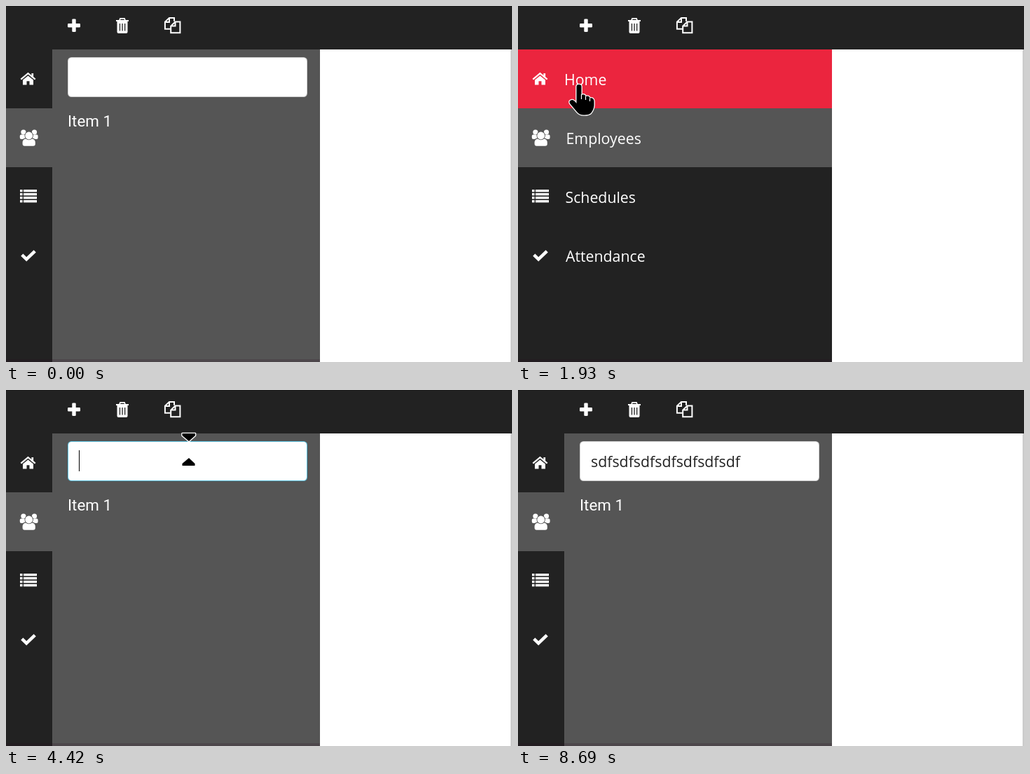
Write an HTML page with a canvas that moves like this. It is 722 by 508 pixels and loops after 8790 ms.

```html
<!DOCTYPE html>
<html lang="en">
<head>
<meta charset="utf-8">
<title>Sidebar menu</title>
<style>
html, body { margin: 0; width: 100%; height: 100%; overflow: hidden; background: #fff; }
canvas { display: block; }
</style>
</head>
<body>
<canvas id="stage" width="722" height="508"></canvas>
<script>
const ctx = document.getElementById('stage').getContext('2d');
const LOOP = 8790, FADE = 400, DARK = '#222', GREY = '#555';
const BAR = 62, ROW = 84, CLOSED = 66, OPEN = 448;
const FOCUS = 4420, BLUR = 8690, TYPE_START = 4770, TYPE_END = 6260, BLINK = 530;
const SANS = '21.3px "Open Sans", "Noto Sans", sans-serif';
const TYPED = 'sdf'.repeat(7);

// Pointer stops: time, x, y
const stops = [
  [70, 565, 300], [650, 50, 298], [1130, 61, 361], [1836, 87, 112], [1930, 87, 112],
  [2590, 229, 56], [2670, 229, 56], [3200, 100, 32], [3680, 215, 45], [4230, 260.5, 85],
  [6270, 260.5, 85], [6580, 108, 165], [6690, 193, 174], [6790, 193, 174],
  [6900, 40, 186], [7150, 530, 210], [7650, 330, 170], [8330, 690, 410]
];

const within = (x, y, l, t, w, h) => x >= l && x < l + w && y >= t && y < t + h;

// Hover zones; spans of [enter, leave] are found by walking the pointer path
const zone = hit => ({ hit, spans: [] });
const menuZone = zone((x, y, width) => within(x, y, 0, BAR, width, 4 * ROW));
const itemZone = zone((x, y, width) => x >= width && within(x, y, 88, 145, 342, 36));
const rows = [['Home', 66, home], ['Employees', 68.5, users], ['Schedules', 67.5, list], ['Attendance', 68, check]]
  .map(([label, x, icon], i) => ({
    label, x, icon, active: i === 1, y: BAR + ROW * i,
    ...zone((x, y, width) => within(x, y, 0, BAR + ROW * i, width, ROW))
  }));
const tools = [plus, trash, copy].map((icon, i) => {
  const x = Math.round(66 + 68.5 * i);
  return { x, icon, ...zone((px, py) => within(px, py, x, 0, 68, BAR)) };
});

// CSS "ease": cubic-bezier(.25, .1, .25, 1)
function ease(x) {
  if (x <= 0) return 0;
  if (x >= 1) return 1;
  let lo = 0, hi = 1, s;
  for (let i = 0; i < 20; i++) {
    s = (lo + hi) / 2;
    if (.75 * s * (1 - s) + s ** 3 < x) lo = s; else hi = s;
  }
  return .3 * s * (1 - s) ** 2 + 3 * s * s * (1 - s) + s ** 3;
}

const hover = (zone, t) => Math.min(1, zone.spans.reduce((sum, [a, b]) =>
  sum + ease((t - a) / FADE) * (1 - ease((t - b) / FADE)), 0));
const menuWidth = t => Math.round(CLOSED + (OPEN - CLOSED) * hover(menuZone, t));

function pointerAt(t) {
  const i = stops.findIndex(s => s[0] > t);
  if (i < 1) return null;
  const [t0, x0, y0] = stops[i - 1], [t1, x1, y1] = stops[i];
  const u = (t - t0) / (t1 - t0), k = u * u * (3 - 2 * u);
  return [x0 + (x1 - x0) * k, y0 + (y1 - y0) * k];
}

function findSpans() {
  for (let t = 0; t < LOOP; t += 2) {
    const p = pointerAt(t), width = menuWidth(t);
    for (const z of [menuZone, itemZone, ...rows, ...tools]) {
      const over = p !== null && z.hit(...p, width);
      const last = z.spans.at(-1);
      const inside = last !== undefined && last[1] === Infinity;
      if (over && !inside) z.spans.push([t, Infinity]);
      if (!over && inside) last[1] = t;
    }
  }
}

function rect(x, y, w, h, color) {
  ctx.fillStyle = color;
  ctx.fillRect(x, y, w, h);
}

function box(x, y, w, h, r, color) {
  ctx.beginPath();
  ctx.roundRect(x, y, w, h, r);
  ctx.fillStyle = color;
  ctx.fill();
}

function text(s, x, y, font, color) {
  ctx.font = font;
  ctx.fillStyle = color;
  ctx.fillText(s, x, y);
}

function disc(x, y, r, color = '#fff') {
  box(x - r, y - r, 2 * r, 2 * r, r, color);
}

function fill(d, color = '#fff') {
  ctx.fillStyle = color;
  ctx.fill(new Path2D(d));
}

function line(d, width, color = '#fff') {
  ctx.lineWidth = width;
  ctx.strokeStyle = color;
  ctx.stroke(new Path2D(d));
}

const red = v => `rgba(255,38,65,${v})`;

function plus() {
  box(94.3, 18.5, 5.4, 18.5, 1.2, '#fff');
  box(88, 25, 18, 5.4, 1.2, '#fff');
}

function trash() {
  line('M157 21H175M162 20.5L163 17.8H169L170 20.5', 1.8);
  box(158.5, 21.5, 15, 17.5, [0, 0, 2, 2], '#fff');
  for (let x = 161.8; x < 170; x += 3.6) rect(x, 25, 1.3, 10.5, DARK);
}

function copy() {
  line('M234.5 32.8H226.9V22.7L233 16.9H240V21.8M233 17V22.9H227', 2);
  line('M241.5 22.6H248.4V38.3H235.2V28.6ZM241.5 22.6V28.6H235.2', 2);
}

function home() {
  line('M21.3 104.6L31.5 96.2L41.7 104.6', 2.2);
  fill('M24 105.6L31.5 99.4L39 105.6V112.6H33.5V107.2H29.5V112.6H24Z');
  rect(36.4, 96, 2.7, 6, '#fff');
}

function users() {
  for (const side of [-1, 1]) {
    disc(32.7 + side * 7.8, 180, 3.6);
    box(side < 0 ? 19.8 : 37.6, 183.5, 8, 6.5, 2, '#fff');
  }
  box(22.8, 188.5, 19.8, 12, 5, GREY);
  box(23.6, 189.5, 18.2, 10.3, [5, 5, 3, 3], '#fff');
  disc(32.7, 185, 6.2, GREY);
  disc(32.7, 185, 5.4);
}

function list() {
  for (let y = 262; y < 280; y += 5) {
    rect(20, y, 3.6, 3.4, '#fff');
    rect(25, y, 19, 3.4, '#fff');
  }
}

function check() {
  line('M22.8 355.2L29.2 361.4L41.2 349.8', 4.6);
}

const cursors = {
  hand: 'M-3.5 3Q-3.5 0 0 0Q3.5 0 3.5 3V15Q8.5 13 9.5 17Q14.5 15.5 15.5 19.5Q21 18.5 21.5 24V30' +
    'Q21 36 17 41Q14 43.5 8 43.5Q1 44-3 39L-13 27Q-15 23-10 22Q-7 22-3.5 27Z',
  arrow: 'M0 0V32L7.5 25L12.5 35.5L17 33.5L12.5 23.5H22Z',
  beam: 'M-9-23H9.5V-20L.5-12L-9-20ZM-9 23H9V20L.5 12L-9 20Z'
};

function pointer(t, width) {
  const p = pointerAt(t);
  const typing = t >= TYPE_START && t < TYPE_END;
  if (!p || typing) return;
  const clickable = [menuZone, itemZone, ...tools].some(z => z.hit(...p, width));
  const kind = clickable ? 'hand' : within(...p, 88, 73, 342, 57) ? 'beam' : 'arrow';
  ctx.save();
  ctx.translate(...p);
  ctx.lineJoin = 'round';
  line(cursors[kind], 2.6);
  fill(cursors[kind], '#000');
  if (kind === 'hand') line('M3.5 14V21M9.5 17V22M15.5 19.5V24', 1.2);
  ctx.restore();
}

function panel(t) {
  rect(CLOSED, BAR, OPEN - CLOSED, 446, GREY);
  const focused = t >= FOCUS && t < BLUR;
  box(88, 73, 342, 57, 5.5, focused ? '#5bc0de' : '#ccc');
  box(89, 74, 340, 55, 4.5, '#fff');
  const progress = (t - TYPE_START) / (TYPE_END - TYPE_START);
  const count = progress < 0 ? 0 : 1 + Math.floor(progress * (TYPED.length - 1));
  const typed = TYPED.slice(0, count);
  text(typed, 104, 110, SANS, DARK);
  const lit = t < TYPE_END || Math.floor((t - TYPE_END) / BLINK) % 2 === 0;
  if (focused && lit) rect(Math.floor(104 + ctx.measureText(typed).width), 86, 1, 30, '#000');
  rect(88, 145, 342, 36, `rgba(148,148,148,${hover(itemZone, t)})`);
  text('Item 1', 88, 172, '22.4px Roboto, sans-serif', '#fff');
}

function menu(t, width) {
  ctx.save();
  ctx.beginPath();
  ctx.rect(0, BAR, width, 446);
  ctx.clip();
  rect(0, BAR, OPEN, 446, DARK);
  for (const row of rows) {
    rect(0, row.y, OPEN, ROW, row.active ? GREY : red(hover(row, t)));
    row.icon();
    text(row.label, row.x, row.y + 51, SANS, '#fff');
  }
  ctx.restore();
}

function toolbar(t) {
  rect(0, 0, 722, BAR, DARK);
  rect(0, 0, 722, 1, '#1a1a1a');
  for (const tool of tools) {
    rect(tool.x, 0, 68, 61, red(hover(tool, t)));
    tool.icon();
  }
}

function draw() {
  const t = performance.now() % LOOP, width = menuWidth(t);
  rect(0, 0, 722, 508, '#fff');
  rect(720, BAR, 2, 446, '#ccc');
  panel(t);
  menu(t, width);
  rect(0, 504, OPEN, 4, 'rgba(40,10,30,.18)');
  toolbar(t);
  pointer(t, width);
  requestAnimationFrame(draw);
}

findSpans();
draw();
</script>
</body>
</html>
```
